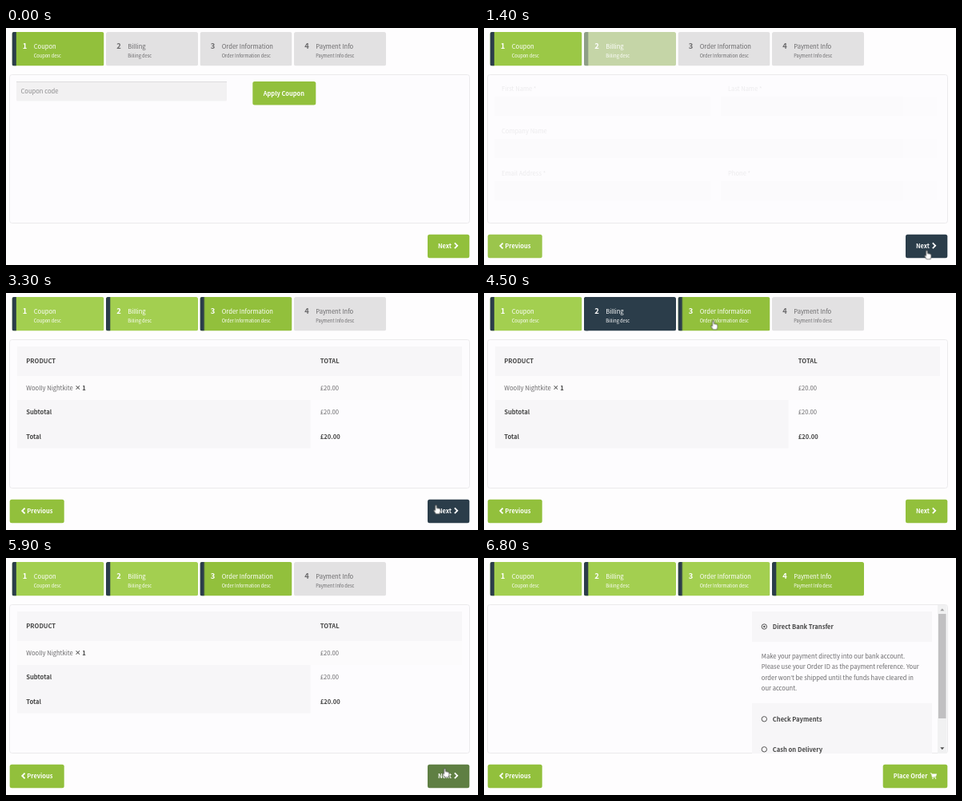
An HTML page that plays this animation: 590 px wide and 297 px high, repeating every 7.1 s.

```html
<!DOCTYPE html>
<html lang="en">
<head>
<meta charset="utf-8">
<title>Checkout wizard</title>
<style>
:root { --green: #92c03c; --done: #a3cf50; --navy: #2b3d4a; --grey: #e2e1e2; --ink: #6a696b; }
html, body { margin: 0; width: 100%; height: 100%; overflow: hidden; background: #fefdfe; }
svg { display: block; width: 590px; height: 297px; }
text { font: 7.6px "Noto Sans CJK JP", "Noto Sans CJK SC", "Noto Sans CJK", "Noto Sans", sans-serif; fill: currentColor; white-space: pre; }
.b { font-weight: 700; }
.num { font-size: 9.4px; font-weight: 700; }
.desc { font-size: 5.65px; }
.btn { color: #fff; }
.btn text { font-size: 7.45px; font-weight: 700; }
.btn path { fill: none; stroke: #fff; stroke-width: 1.8; }
.bg, .btn rect { fill: var(--green); }
.bar { fill: var(--navy); }
.field { fill: #f2f1f2; }
.band { fill: #f7f6f8; }
.radio { fill: none; stroke: #555; stroke-width: 1; }
.tab { color: var(--ink); }
.dark { color: #444; }
svg, .pane { color: var(--ink); }

.tab, .tab *, .pane, .nav, .nav rect, #cursor, #hand, #arrow {
  animation: 7100ms linear infinite;
}

/* tab backgrounds */
#t1 .bg { animation-name: bg1; }
#t2 .bg { animation-name: bg2; }
#t3 .bg { animation-name: bg3; }
#t4 .bg { animation-name: bg4; }
@keyframes bg1 {
  0%, 16.8% { fill: var(--green); }
  22.5%, 69.5% { fill: var(--done); }
  72.5% { fill: var(--navy); }
  78%, 100% { fill: var(--done); }
}
@keyframes bg2 {
  0%, 18.2% { fill: var(--grey); }
  22.5%, 32.2% { fill: var(--green); }
  37%, 53.5% { fill: var(--done); }
  57.5%, 64% { fill: var(--navy); }
  68.5%, 100% { fill: var(--done); }
}
@keyframes bg3 {
  0%, 32.2% { fill: var(--grey); }
  37%, 64.5% { fill: var(--green); }
  68.5%, 70% { fill: var(--navy); }
  75%, 88.7% { fill: var(--green); }
  93.5%, 100% { fill: var(--done); }
}
@keyframes bg4 {
  0%, 88.7% { fill: var(--grey); }
  93.5%, 100% { fill: var(--green); }
}

/* tab edge bars and labels */
#t1 { color: #fff; }
#t2 { animation-name: ink2; }
#t3 { animation-name: ink3; }
#t4 { animation-name: ink4; }
@keyframes ink2 { 0%, 16.8% { color: var(--ink); } 16.81%, 100% { color: #fff; } }
@keyframes ink3 { 0%, 30.8% { color: var(--ink); } 30.81%, 100% { color: #fff; } }
@keyframes ink4 { 0%, 87.2% { color: var(--ink); } 87.21%, 100% { color: #fff; } }
#t2 .bar { animation-name: bar2; }
#t3 .bar { animation-name: bar3; }
#t4 .bar { animation-name: bar4; }
@keyframes bar2 { 0%, 18.2% { opacity: 0; } 22.5%, 100% { opacity: 1; } }
@keyframes bar3 { 0%, 32.2% { opacity: 0; } 37%, 100% { opacity: 1; } }
@keyframes bar4 { 0%, 88.7% { opacity: 0; } 93.5%, 100% { opacity: 1; } }

/* step contents: cut out, fade in */
#coupon { animation-name: pane1; }
#billing { animation-name: pane2; }
#order { animation-name: pane3; }
#payment { animation-name: pane4; }
@keyframes pane1 { 0%, 16.8% { opacity: 1; } 16.81%, 100% { opacity: 0; } }
@keyframes pane2 { 0%, 19% { opacity: 0; } 25.3%, 30.8% { opacity: 1; } 30.81%, 100% { opacity: 0; } }
@keyframes pane3 { 0%, 33% { opacity: 0; } 40.8%, 87.2% { opacity: 1; } 87.21%, 100% { opacity: 0; } }
@keyframes pane4 { 0%, 88.8% { opacity: 0; } 95.5%, 100% { opacity: 1; } }

/* navigation buttons */
#prev { animation-name: prev; }
#next { animation-name: next; }
#place { animation-name: place; }
#next rect { animation-name: nextBg; }
#place rect { animation-name: placeBg; }
@keyframes prev { 0%, 16.8% { opacity: 0; } 20%, 100% { opacity: 1; } }
@keyframes next { 0%, 87.2% { opacity: 1; } 87.21%, 100% { opacity: 0; } }
@keyframes place { 0%, 87.2% { opacity: 0; } 87.21%, 100% { opacity: 1; } }
@keyframes nextBg {
  0%, 9.9% { fill: var(--green); }
  15.2%, 47.9% { fill: var(--navy); }
  53.5%, 80.3% { fill: var(--green); }
  86%, 100% { fill: var(--navy); }
}
@keyframes placeBg { 0%, 87.2% { fill: var(--navy); } 91.5%, 100% { fill: var(--green); } }

/* pointer */
#cursor { animation-name: move, seen; }
#hand { animation-name: hand; }
#arrow { animation-name: arrow; }
@keyframes move {
  0%, 1.4% { transform: translate(446px, 160px); animation-timing-function: ease-in-out; }
  11.2%, 46.4% { transform: translate(553.5px, 278.5px); }
  46.41%, 46.9% { transform: translate(537.5px, 265.5px); animation-timing-function: ease-in-out; }
  55% { transform: translate(215px, 22px); }
  58% { transform: translate(190px, 30px); }
  62% { transform: translate(228px, 36px); }
  63.3%, 65% { transform: translate(286.5px, 34.5px); }
  68.5% { transform: translate(280px, 30px); }
  71.5% { transform: translate(100px, 26px); animation-timing-function: ease-in-out; }
  77.4%, 100% { transform: translate(548.5px, 263.5px); }
}
@keyframes seen {
  0%, 1.39% { opacity: 0; }
  1.4%, 91.5% { opacity: 1; }
  91.51%, 100% { opacity: 0; }
}
@keyframes hand {
  0%, 9.5% { opacity: 0; }
  9.51%, 47.9% { opacity: 1; }
  47.91%, 53.5% { opacity: 0; }
  53.51%, 72.8% { opacity: 1; }
  72.81%, 76.6% { opacity: 0; }
  76.61%, 100% { opacity: 1; }
}
@keyframes arrow {
  0%, 9.5% { opacity: 1; }
  9.51%, 47.9% { opacity: 0; }
  47.91%, 53.5% { opacity: 1; }
  53.51%, 72.8% { opacity: 0; }
  72.81%, 76.6% { opacity: 1; }
  76.61%, 100% { opacity: 0; }
}
</style>
</head>
<body>
<svg viewBox="0 0 590 297">
  <defs>
    <clipPath id="tabClip"><rect width="115" height="42.5" rx="2.5"/></clipPath>
    <clipPath id="panelClip"><rect x="5" y="59" width="574" height="185.5"/></clipPath>
  </defs>

  <g id="t1" class="tab" transform="translate(7.5 5)">
    <g clip-path="url(#tabClip)"><rect class="bg" width="115" height="42.5"/><rect class="bar" width="5.3" height="42.5"/></g>
    <text class="num" x="13.3" y="21.2">1</text><text x="27.2" y="21">Coupon</text><text class="desc" x="27.2" y="32.3">Coupon desc</text>
  </g>
  <g id="t2" class="tab" transform="translate(125 5)">
    <g clip-path="url(#tabClip)"><rect class="bg" width="115" height="42.5"/><rect class="bar" width="5.3" height="42.5"/></g>
    <text class="num" x="13.3" y="21.2">2</text><text x="27.2" y="21">Billing</text><text class="desc" x="27.2" y="32.3">Billing desc</text>
  </g>
  <g id="t3" class="tab" transform="translate(242.5 5)">
    <g clip-path="url(#tabClip)"><rect class="bg" width="115" height="42.5"/><rect class="bar" width="5.3" height="42.5"/></g>
    <text class="num" x="13.3" y="21.2">3</text><text x="27.2" y="21">Order Information</text><text class="desc" x="27.2" y="32.3">Order Information desc</text>
  </g>
  <g id="t4" class="tab" transform="translate(360 5)">
    <g clip-path="url(#tabClip)"><rect class="bg" width="115" height="42.5"/><rect class="bar" width="5.3" height="42.5"/></g>
    <text class="num" x="13.3" y="21.2">4</text><text x="27.2" y="21">Payment Info</text><text class="desc" x="27.2" y="32.3">Payment Info desc</text>
  </g>

  <rect x="4.5" y="58.5" width="575" height="186" rx="3" fill="#fdfcfe" stroke="#ebeaec"/>

  <g clip-path="url(#panelClip)">
    <g id="coupon" class="pane">
      <rect class="field" x="13" y="67" width="263" height="24.5" rx="1.5"/>
      <path d="M13 67.5h263" stroke="#dddcde"/>
      <text x="18.5" y="81.7" fill-opacity=".75">Coupon code</text>
      <g class="btn"><rect x="308.3" y="67" width="79" height="29.5" rx="2.5"/><text x="321.8" y="84.6">Apply Coupon</text></g>
    </g>

    <g id="billing" class="pane">
      <text x="22" y="79">First Name *</text><rect class="field" x="13" y="86" width="270" height="24"/>
      <text x="305" y="79">Last Name *</text><rect class="field" x="296" y="86" width="270" height="24"/>
      <text x="22" y="132">Company Name</text><rect class="field" x="13" y="139" width="553" height="24"/>
      <text x="22" y="185">Email Address *</text><rect class="field" x="13" y="192" width="270" height="24"/>
      <text x="305" y="185">Phone *</text><rect class="field" x="296" y="192" width="270" height="24"/>
    </g>

    <g id="order" class="pane">
      <rect class="band" x="14" y="67" width="556" height="37"/>
      <rect x="14" y="104" width="556" height="30" fill="#fcfbfc"/>
      <rect class="band" x="14" y="134" width="366.5" height="60.5"/>
      <g class="dark">
        <text class="b" x="25.3" y="88">PRODUCT</text><text class="b" x="392.8" y="88">TOTAL</text>
        <text class="b" x="86" y="121.8">× 1</text>
        <text class="b" x="25.3" y="152.2">Subtotal</text>
        <text class="b" x="25.3" y="182.8">Total</text><text class="b" x="392.8" y="182.8">£20.00</text>
      </g>
      <text x="25.3" y="121.8">Woolly Nightkite</text><text x="392.8" y="121.8">£20.00</text>
      <text x="392.8" y="152.2">£20.00</text>
    </g>

    <g id="payment" class="pane">
      <rect class="band" x="335" y="67" width="225" height="38"/>
      <rect class="band" x="335" y="182" width="225" height="63"/>
      <circle class="radio" cx="350.3" cy="86" r="3.2"/><circle cx="350.3" cy="86" r="1.2" fill="#555"/>
      <circle class="radio" cx="350.3" cy="201.8" r="3.2"/>
      <circle class="radio" cx="350.3" cy="239.8" r="3.2"/>
      <g class="dark">
        <text class="b" x="360.8" y="88.7">Direct Bank Transfer</text>
        <text class="b" x="360.8" y="204.6">Check Payments</text>
        <text class="b" x="360.8" y="242.5">Cash on Delivery</text>
      </g>
      <text x="346.8" y="126">Make your payment directly into our bank account.</text>
      <text x="346.8" y="139.3">Please use your Order ID as the payment reference. Your</text>
      <text x="346.8" y="152.6">order won’t be shipped until the funds have cleared in</text>
      <text x="346.8" y="165.9">our account.</text>
      <rect x="567" y="59" width="11.5" height="186" fill="#f1f1f2"/>
      <rect x="568" y="70" width="9.5" height="131" fill="#c1c0c2"/>
      <path d="M570.3 66.3h5l-2.5-3z" fill="#a2a2a3"/>
      <path d="M570.3 237.2h5l-2.5 3z" fill="#505050"/>
    </g>
  </g>

  <g id="prev" class="btn nav">
    <rect x="4.7" y="258.7" width="68" height="29.5" rx="2.5"/>
    <path d="M23.6 269.6l-3.4 3.4 3.4 3.4"/><text x="26.3" y="275.8">Previous</text>
  </g>
  <g id="next" class="btn nav">
    <rect x="527" y="258.7" width="52.3" height="29.5" rx="2.5"/>
    <text x="540" y="275.8">Next</text><path d="M560.8 269.4l3.4 3.4-3.4 3.4"/>
  </g>
  <g id="place" class="btn nav">
    <rect x="498.7" y="258.7" width="80.6" height="29.5" rx="2.5"/>
    <text x="511.8" y="275.8">Place Order</text>
    <path d="M557.8 269.9h1.6l1 4.8h4.6" style="stroke-width:.9"/>
    <path d="M559.8 270.4h6.2l-.8 3.2-4.8.5z" style="fill:#fff;stroke:none"/>
    <circle cx="561" cy="276.2" r=".8" fill="#fff"/><circle cx="564.5" cy="276.2" r=".8" fill="#fff"/>
  </g>

  <g id="cursor" fill="#fff" stroke="#333" stroke-width=".7" stroke-linejoin="round">
    <path id="arrow" d="M0 0v9.2l2.1-2 1.5 3.3 1.4-.6-1.4-3.2h2.9z"/>
    <path id="hand" d="M-1 .8Q0-.6 1 .8V4.2Q2 3.4 2.8 4.5 3.7 3.9 4.3 5 5.5 4.6 5.6 6V8.3L4.6 11.4H-.2L-2.8 7.3Q-2.9 6-1.8 6.3L-1 7.2Z"/>
  </g>
</svg>
</body>
</html>
```
